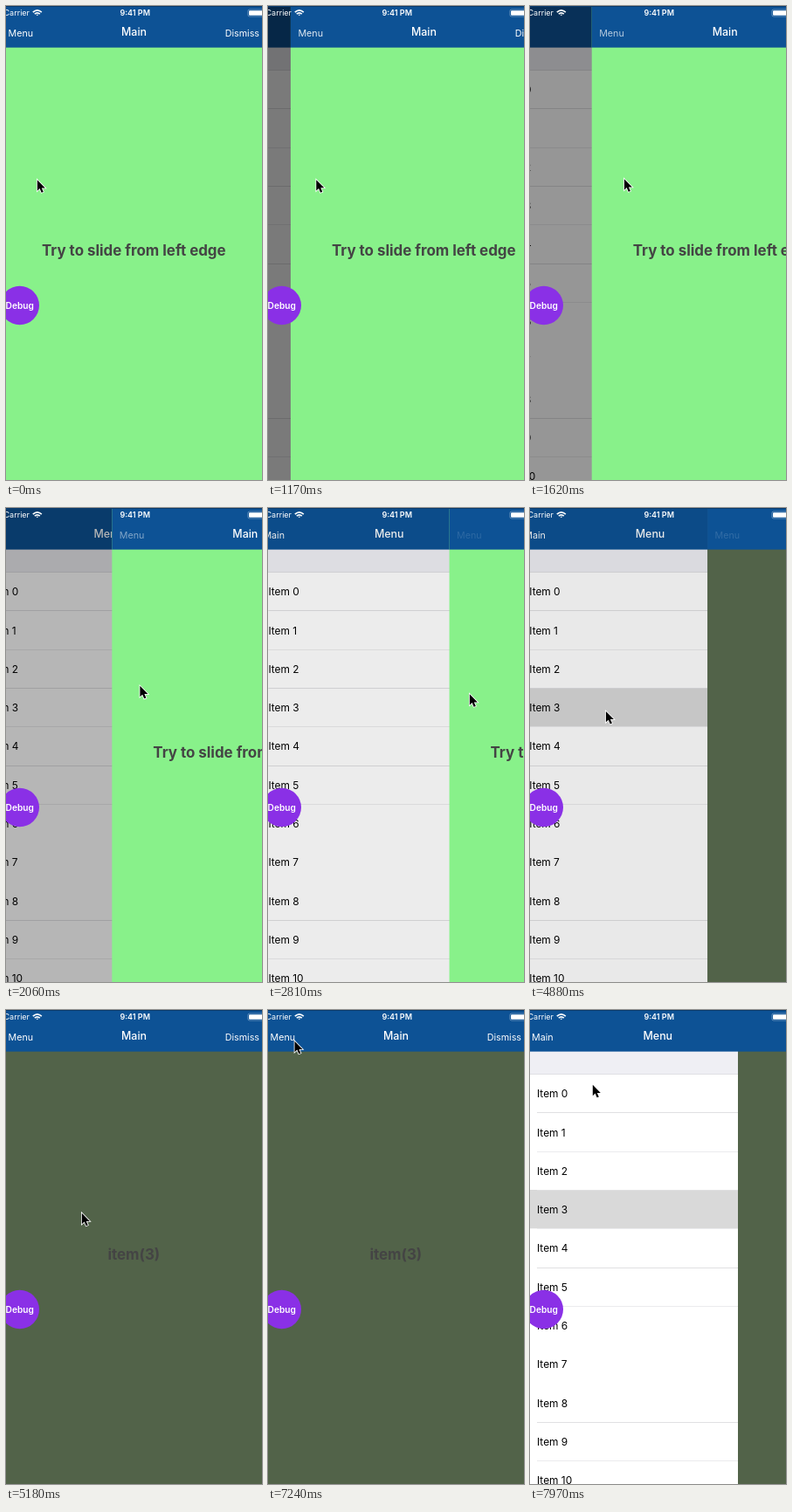
An HTML page that plays this animation: 293 px wide and 543 px high, repeating every 8000 ms.

```html
<!DOCTYPE html>
<html>
<head>
<meta charset="utf-8">
<style>
  html, body { margin: 0; width: 100%; height: 100%; overflow: hidden; }
  svg { display: block; width: 100vw; height: 100vh; }
  text { font-family: Inter, Roboto, sans-serif; }
  .title { font-size: 12.4px; font-weight: 500; fill: #fff; text-anchor: middle; }
  .btn { font-size: 10.7px; fill: #fff; }
  .item { font-size: 11.9px; fill: #000; }
  .big { font-size: 16.9px; font-weight: 700; fill: #444; text-anchor: middle; }
  .status { font-size: 9px; fill: #fff; }
</style>
</head>
<body>
<svg viewBox="0 0 293 543" preserveAspectRatio="none">
  <g id="menu">
    <rect width="360" height="543" fill="#fff"/>
    <rect y="47" width="360" height="27" fill="#efeff4"/>
    <rect y="73" width="360" height="1" fill="#e0e0e4"/>
    <g id="rows"></g>
    <rect x="-10" width="370" height="47.6" fill="#0d5295"/>
    <text class="btn" x="2" y="35">Main</text>
    <text class="title" x="146.3" y="33.5">Menu</text>
  </g>
  <rect id="dim" width="293" height="543"/>
  <g id="main">
    <rect id="page" x="-6" width="305" height="543"/>
    <rect x="-6" width="305" height="47.6" fill="#0d5295"/>
    <text class="btn" id="menuBtn" x="2.5" y="35">Menu</text>
    <text class="title" x="146.5" y="33.5">Main</text>
    <text class="btn" x="290" y="35" text-anchor="end">Dismiss</text>
    <text class="big" id="label" x="146.3" y="286"></text>
  </g>
  <rect width="293" height="1" fill="#0a3a6b"/>
  <text class="status" x="27" y="11.3" text-anchor="end">Carrier</text>
  <g fill="none" stroke="#fff" stroke-width="1.7">
    <path d="M30.8 7.2Q35.8 2.6 40.8 7.2M32.8 9.1Q35.8 6.5 38.8 9.1"/>
    <path d="M34.4 9.8h2.8l-1.4 1.5z" fill="#fff" stroke="none"/>
  </g>
  <text class="status" x="147.7" y="11.3" text-anchor="middle" font-weight="600">9:41 PM</text>
  <rect x="276.8" y="4" width="20" height="8" rx="2" fill="none" stroke="#fff" stroke-width=".8" opacity=".4"/>
  <rect x="278" y="5.2" width="18" height="5.6" rx="1" fill="#fff"/>
  <circle cx="15.7" cy="343" r="22.3" fill="#8a30e6"/>
  <text x="15.7" y="346.6" text-anchor="middle" font-size="10.2" font-weight="600" fill="#fff">Debug</text>
  <path id="cursor" d="M0 0v12.4l2.8-2.6 2 4.7 2.2-.9-2-4.5h4z" fill="#000"
    stroke="#fff" stroke-width="1.6" paint-order="stroke"/>
</svg>
<script>
const LOOP = 8000, OPEN = 244, PICK = 4800;
const $ = id => document.getElementById(id);
const smooth = u => u * u * (3 - 2 * u);
const linear = u => u;

// Keys are [time, value, ...]; returns the values at time t.
function track(keys, t, ease) {
  let i = 0;
  while (i < keys.length - 2 && t >= keys[i + 1][0]) i++;
  const a = keys[i], b = keys[i + 1];
  const u = ease(Math.min(1, Math.max(0, (t - a[0]) / (b[0] - a[0]))));
  return a.slice(1).map((v, k) => v + (b[k + 1] - v) * u);
}

const drag = [[0, 0], [850, 0], [1620, 76.6], [2810, 213.5], [3400, 238], [3600, OPEN]];
const taps = [[PICK, OPEN], [5140, 0], [7370, 0], [7720, OPEN]];
const pointer = [
  [0, 35.8, 199.3], [550, 6, 200], [750, 6, 200], [1620, 107.8, 198.3],
  [2810, 230.8, 213.3], [3400, 253.8, 212.8], [3860, 253.8, 212.8],
  [4590, 87, 233], [5300, 86.8, 232.8], [6000, 176, 213],
  [7090, 26, 42], [7230, 30.5, 35.8], [7480, 30.5, 35.8], [7970, 71.8, 85.8]
];

const ROW = 44.3, TOP = 73.5;
let rows = `<rect id="picked" y="${Math.round(TOP + 3 * ROW)}" width="360" height="${ROW}" fill="#d9d9d9"/>`;
for (let i = 0; i <= 10; i++) {
  const y = TOP + i * ROW;
  rows += `<text class="item" x="8" y="${y + 26.7}">Item ${i}</text>`;
  if (i !== 6 && i !== 7)
    rows += `<rect x="8" y="${Math.round(y + ROW - 0.45)}" width="352" height="1" fill="${i % 2 ? '#ebebed' : '#e0e0e2'}"/>`;
}
$('rows').innerHTML = rows;

function draw(t) {
  const picked = t >= PICK;
  const dragging = t > 750 && t < 2810;
  const d = (picked ? track(taps, t, smooth) : track(drag, t, linear))[0];
  const [x, y] = track(pointer, t, dragging ? linear : smooth);
  $('menu').setAttribute('transform', `translate(${(d - OPEN) / 4})`);
  $('dim').setAttribute('opacity', 0.6 * (1 - d / OPEN));
  $('main').setAttribute('transform', `translate(${d})`);
  $('menuBtn').setAttribute('opacity', 1 - d / OPEN);
  $('page').setAttribute('fill', picked ? '#526349' : '#88f18a');
  $('label').textContent = picked ? 'item(3)' : 'Try to slide from left edge';
  $('picked').setAttribute('visibility', picked ? 'visible' : 'hidden');
  $('cursor').setAttribute('transform', `translate(${x} ${y})`);
}

const start = performance.now();
function tick() {
  draw((performance.now() - start) % LOOP);
  requestAnimationFrame(tick);
}
draw(0);
tick();
</script>
</body>
</html>
```
